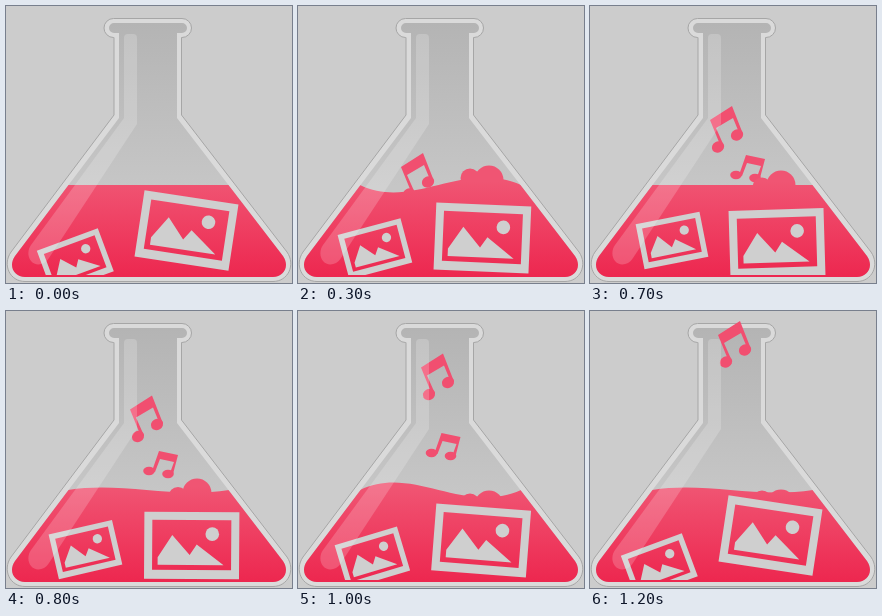
An HTML page that plays this animation: 286 by 277 pixels, repeating every 1300 ms.

```html
<!DOCTYPE html>
<html lang="en">
<head>
<meta charset="utf-8">
<title>Media flask</title>
<style>
html, body { margin: 0; width: 100%; height: 100%; overflow: hidden; background: #ccc; }
svg { display: block; }
</style>
</head>
<body>
<svg width="286" height="277" viewBox="0 0 286 277">
  <defs>
    <linearGradient id="glass" x1="0" y1="17" x2="0" y2="180" gradientUnits="userSpaceOnUse">
      <stop stop-color="#b4b4b4"/><stop offset="1" stop-color="#c6c6c6"/>
    </linearGradient>
    <linearGradient id="pink" x1="0" y1="175" x2="0" y2="271" gradientUnits="userSpaceOnUse">
      <stop stop-color="#f05573"/><stop offset="1" stop-color="#ed274f"/>
    </linearGradient>
    <path id="inside" d="M113 27H108a5 5 0 0 1 0-10H176a5 5 0 0 1 0 10H171V112L277 250C284 260 278 271 267 271H19C8 271 2 260 9 250L113 112Z"/>
    <clipPath id="inner"><use href="#inside"/></clipPath>
    <clipPath id="floor"><rect width="286" height="269"/></clipPath>
    <g id="picture" fill="#cfcfcf">
      <path fill-rule="evenodd" d="M-47.5-33.5h95v67h-95zM-39.5-25.5v50h79v-50z"/>
      <path d="M-34 19.5V12L-19.5-10.5L-2 9.500L5-1L32 19.5Z"/>
      <circle cx="20.500" cy="-11.500" r="6.800"/>
    </g>
  </defs>

  <path fill="#dadada" stroke="#a6a6a6" d="M108 31.5H107.500A9.500 9.500 0 0 1 107.500 12.500H176A9.500 9.500 0 0 1 176 31.500H175.500V109L281 246C290 259 282 275.500 267 275.500H19C4 275.500 -4 259 5 246L108 109Z"/>
  <use href="#inside" fill="url(#glass)"/>

  <g fill="#f14f70">
    <g id="bigNote">
      <path d="M120 114L142 100L153 128L150 129L143 112L126 122L134 140L131 141Z"/>
      <ellipse cx="128" cy="141" rx="6.300" ry="5.500" transform="rotate(-30 128 141)"/>
      <ellipse cx="147" cy="129" rx="6.300" ry="5.500" transform="rotate(-30 147 129)"/>
    </g>
    <g id="smallNote">
      <path d="M156 149L175 153L170 172L167 171L171 160L157 157L152 170L149 169Z"/>
      <ellipse cx="146" cy="169" rx="5.800" ry="4.200"/>
      <ellipse cx="165" cy="172" rx="5.800" ry="4.200"/>
    </g>
  </g>

  <g clip-path="url(#inner)" fill="url(#pink)">
    <circle id="smallBubble" cx="172" r="9.500"/>
    <circle id="bigBubble" cx="191" r="14.500"/>
    <path id="liquid"/>
  </g>
  <g clip-path="url(#floor)">
    <use id="leftPicture" href="#picture"/>
    <use id="rightPicture" href="#picture"/>
  </g>
  <path fill="#fff" fill-opacity=".19" d="M118 32Q118 28 122 28H127Q131 28 131 32V118L43 252C38 260 29 260 25 255C21 250 22 243 25 239L118 112Z"/>
</svg>
<script>
const el = id => document.getElementById(id);
const mix = (a, b, u) => a + (b - a) * u;

// Per-pose paths, one value for each of the twelve poses.
const noteX = [-18, -18, -18, -17, -15.5, -8, 0, 4, 3.5, 3, 5, 8];
const noteY = [86, 73, 60, 47, 33, 16, 0, -15.5, -37, -57.5, -74, -90];
const smallNoteX = [-3, -3, -3, -3, -3, -1, 0, -3, -8, -12.5, -16];
const bigBubbleY = [196, 187, 179, 174, 169, 174, 179, 182, 188, 194, 194, 193];
const smallBubbleY = [192, 184, 175.5, 172, 168.5, 176, 181, 185.5, 189, 192, 191, 189];

function place(id, x, y, angle = 0, scale = 1) {
  el(id).setAttribute('transform', `translate(${x} ${y}) rotate(${angle}) scale(${scale})`);
}

function draw(now) {
  const step = Math.floor(now / 100) % 13;
  const k = step < 4 ? step : step - 1; // one pose is held twice as long

  const u = Math.min(k, 11 - k) / 5;
  place('leftPicture', mix(69.3, 82, u), mix(255, 234.5, u), mix(-20.4, -11.2, u), 0.685);
  place('rightPicture', mix(180.5, 187, u), mix(224.5, 237, u), mix(8.6, -1.7, u));

  const wave = 8.6 * (k < 3 ? k : k < 9 ? 6 - k : k - 12);
  el('liquid').setAttribute('d',
    `M0 179H62C115 ${179 + wave} 165 ${179 - wave} 223 179H286V277H0Z`);

  place('bigNote', noteX[k], noteY[k]);
  place('smallNote', smallNoteX[k] || 0, 9 * (6 - k));
  el('smallNote').style.display = k > 2 && k < 11 ? '' : 'none';
  el('bigBubble').setAttribute('cy', bigBubbleY[k]);
  el('smallBubble').setAttribute('cy', smallBubbleY[k]);
}

function loop() {
  draw(performance.now());
  requestAnimationFrame(loop);
}
loop();
</script>
</body>
</html>
```
